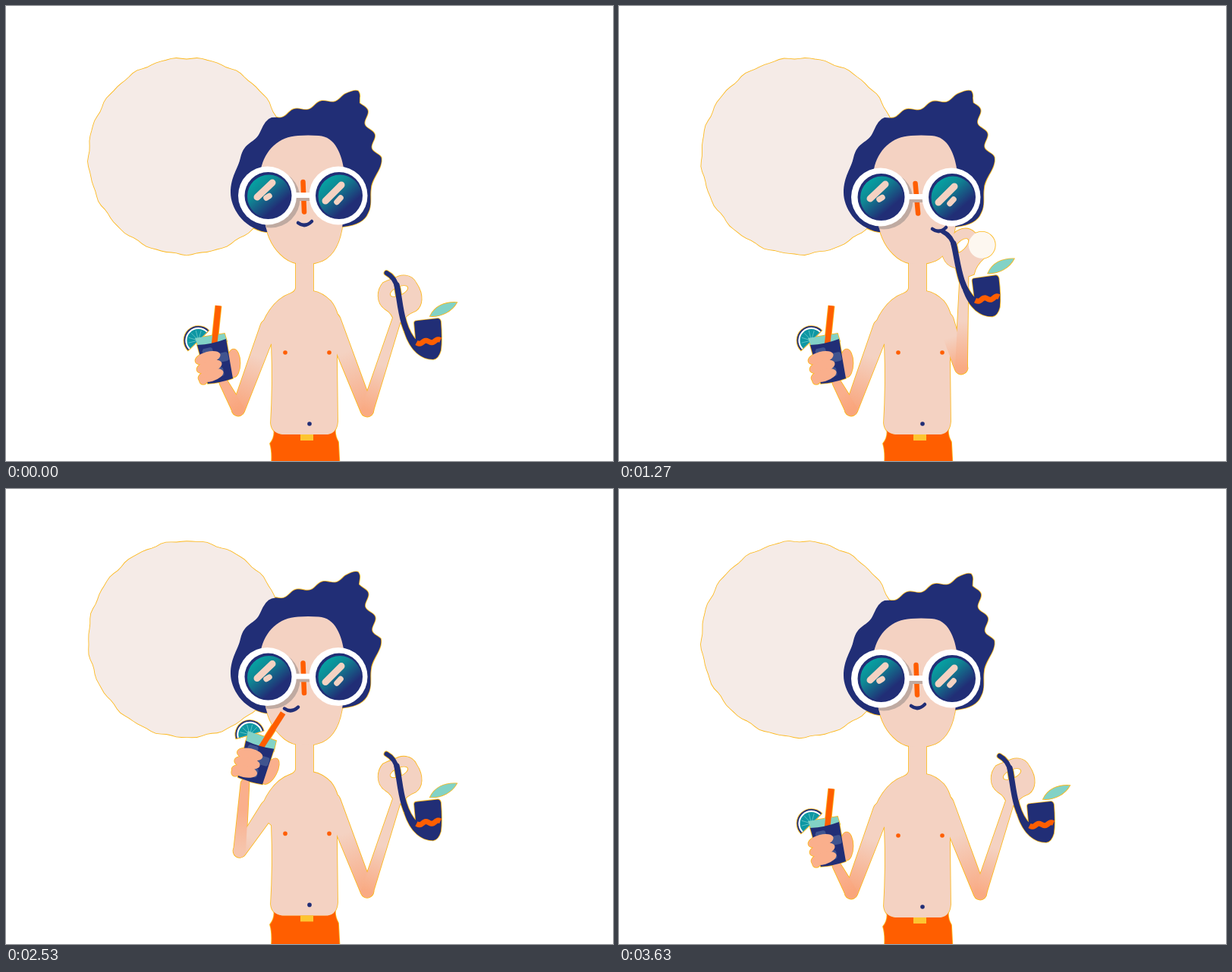
An HTML page with a canvas that plays this animation: 800x600 px, repeating every 3660 ms.

```html
<!DOCTYPE html>
<html lang="en">
<head>
<meta charset="utf-8">
<title>Summer break</title>
<style>
html, body { margin: 0; width: 100%; height: 100%; overflow: hidden; background: #fff; }
canvas { display: block; }
</style>
</head>
<body>
<canvas id="stage" width="800" height="600"></canvas>
<script>
const ctx = document.getElementById('stage').getContext('2d');
const LOOP = 3660, DEG = Math.PI / 180, TAU = Math.PI * 2;
const SKIN = '#f4d2c2', HAND = '#faaf8c', NAVY = '#212e76', ORANGE = '#ff5e00',
      MINT = '#82d2c6', TEAL = '#0e97a3', RIM = '#fcb81c';
let outline = false;   // first pass lays a thin rim under the whole silhouette

const ease = (t, from, to) => {
  const u = Math.min(1, Math.max(0, (t - from) / (to - from)));
  return u * u * (3 - 2 * u);
};
const pulse = (t, a, b, c, d) => ease(t, a, b) - ease(t, c, d);
const mix = (a, b, u) => a.map((v, i) => v + (b[i] - v) * u);
const tan = k => `rgb(${244 + 5 * k}, ${210 - 45 * k}, ${194 - 70 * k})`;

// How far each action has gone, 0 to 1
function poseAt(t) {
  const puff = pulse(t, 320, 680, 1830, 2400);
  return {
    t, puff, sip: pulse(t, 1780, 2220, 2980, 3430),
    arc: puff ** 1.3, late: puff ** 2,
    gasp: pulse(t, 500, 660, 720, 950), suck: pulse(t, 1960, 2110, 2160, 2600)
  };
}

function oval(x, y, rx, ry = rx, angle = 0) {
  const path = new Path2D();
  path.ellipse(x, y, rx, ry, angle * DEG, 0, TAU);
  return path;
}

function fill(color, path) {
  if (typeof path === 'string') path = new Path2D(path);
  ctx.fillStyle = outline ? RIM : color;
  ctx.fill(path, 'evenodd');
  if (outline) {
    ctx.strokeStyle = RIM;
    ctx.lineWidth = 1.7;
    ctx.stroke(path);
  }
}

function line(color, width, d, cap = 'round') {
  ctx.strokeStyle = outline ? RIM : color;
  ctx.lineWidth = width + (outline ? 1.7 : 0);
  ctx.lineCap = cap;
  ctx.stroke(new Path2D(d));
}

// Moves a drawing by x, y and turns it about the pivot px, py
function group(draw, x, y, angle = 0, px = 0, py = 0) {
  ctx.save();
  ctx.translate(x + px, y + py);
  ctx.rotate(angle * DEG);
  ctx.translate(-px, -py);
  draw();
  ctx.restore();
}

function gradient(x0, y0, x1, y1, ...stops) {
  const g = ctx.createLinearGradient(x0, y0, x1, y1);
  stops.forEach(([at, color]) => g.addColorStop(at, color));
  return g;
}

// Tapered limb with round ends
function limb([x0, y0], [x1, y1], w0, w1, ...stops) {
  const a = Math.atan2(y1 - y0, x1 - x0), q = Math.PI / 2, path = new Path2D();
  path.arc(x0, y0, w0 / 2, a + q, a + 3 * q);
  path.arc(x1, y1, w1 / 2, a - q, a + q);
  path.closePath();
  fill(gradient(x0, y0, x1, y1, ...stops), path);
}

// Wavy edge between two points, as path commands
function ripple(x0, y0, x1, y1, waves, height, phase) {
  const length = Math.hypot(x1 - x0, y1 - y0);
  let d = '';
  for (let u = 0; u <= 1; u += 1 / 40) {
    const h = height * Math.sin(waves * TAU * u + phase);
    d += `L${x0 + (x1 - x0) * u - (y1 - y0) / length * h} ${y0 + (y1 - y0) * u + (x1 - x0) / length * h}`;
  }
  return d;
}

const face = new Path2D('M336 215C341 190 360 172 385 171Q398 170 412 171C434 172 443 196 446 220' +
  'L444 285C441 312 432 329 417 336Q405 341 393 340Q379 341 367 332C352 320 345 305 341 285Z');
const torso = 'M382 330V371Q382 376 375 379C352 387 339 412 334 432L350 446Q352 500 349 550' +
  'Q350 563 364 565H424Q436 563 437 548L436 457L442 437C440 415 437 400 428 389Q417 378 405 376V330Z';
const okHand = new Path2D('M512 417Q509 405 500 400C487 391 489 374 497 365Q504 361 511 360' +
  'C520 353 535 353 541 366C551 381 549 396 540 402Q527 407 521 417Z');
okHand.addPath(oval(518, 376, 13, 6, -25));

function drawSun({ t }) {
  const path = new Path2D(), phase = t / LOOP * TAU;
  for (let a = 0; a < TAU; a += TAU / 120) {
    const r = 129 + .8 * Math.sin(17 * a + 3 * phase) + .6 * Math.sin(29 * a - 5 * phase);
    path.lineTo(238 + r * Math.cos(a), 198 + r * Math.sin(a));
  }
  path.closePath();
  fill('#f5ebe7', path);
}

function drawHair({ t }) {
  const sway = .4 * Math.sin(4 * t / LOOP * TAU);
  fill(NAVY, 'M395 300L342 298C311 292 296 265 296 246C296 225 306 214 309 200C314 178 328 182 335 166' +
    'Q342 149 350 147' + ripple(356, 146, 450, 118, 2.7, 3, .3 + sway) +
    'Q459 110 464 112Q467 116 466 121' + ripple(469, 127, 491, 203, 2.4, -4.5, -.8 + sway) +
    'C497 214 482 226 481 240C479 252 483 262 477 273Q471 288 445 291Z');
}

function drawBody() {
  fill(ORANGE, 'M353 558Q356 565 366 565H420Q432 565 434 558Q433 566 438 575L440 612H349' +
    'Q352 590 348 577Q355 568 353 558Z');
  fill(SKIN, torso);
  if (outline) return;
  fill('#fdc531', 'M388 565H405V573H388Z');
  for (const x of [368, 426]) fill(ORANGE, oval(x, 457, 2.8));
  fill(NAVY, oval(400, 551, 2.8));
}

function drawLens(x) {
  fill('#fff', oval(x, 250, 38.5));
  fill(NAVY, oval(x + 1, 250, 31));
  fill(gradient(x - 18, 229, x + 20, 274, [0, '#05a3a3'], [.3, '#0f8794'], [.8, NAVY]),
    oval(x + 2, 251, 28.5));
}

function drawGlasses(y) {
  ctx.save();
  ctx.clip(face);
  fill('#bfaaa1', oval(349, 254 + y, 38.5));
  line('#bfaaa1', 7, `M380 ${253.5 + y}H404`, 'butt');
  ctx.restore();
  group(() => {
    line('#fff', 7, 'M378 249.5H404', 'butt');
    drawLens(344.5);
    drawLens(438);
    line(SKIN, 9, 'M331 252L351 233M421 257L442 236');
    line(SKIN, 7.5, 'M343 253L347 250.5M436 258.5L441 253');
  }, 0, y);
}

function drawHead({ puff, late, sip, gasp, suck }) {
  fill(SKIN, face);
  if (outline) return;
  const glassesY = 2 * puff + 2 * suck;
  group(() => line(ORANGE, 6.5, 'M391.5 232L393 271.5'), 0, glassesY, -3 * late, 392, 250);
  drawGlasses(glassesY);
  const open = gasp + suck, bend = 1 - open;
  const x = 394 + 28 * late - 18 * sip - 5 * gasp, y = 287 + 8 * late + 5 * sip + 4 * gasp + 15 * suck;
  line(NAVY, 4.5, `M${x - 9} ${y - bend}Q${x} ${y + 6 * bend} ${x + 9} ${y - 3 * bend}`);
  fill(NAVY, oval(x, y, 9 + 2 * open, .5 + 5 * open, -4));
}

function drawLime() {
  [[19, NAVY], [17.2, '#fff'], [15, TEAL]].forEach(([r, color]) =>
    fill(color, `M${-r} 0A${r} ${r} 0 0 1 ${r} 0Z`));
  if (outline) return;
  for (let a = 30; a < 180; a += 30) {
    const x = Math.cos(a * DEG), y = -Math.sin(a * DEG);
    line('#6cc5c8', .8, `M${3 * x} ${3 * y}L${13 * x} ${13 * y}`);
  }
}

function drawDrink({ t, sip, suck }) {
  const elbow = mix([306, 532], [308, 480], sip), wrist = mix([287, 497], [315, 391], sip);
  const angle = 28 * sip, warmth = 1 - .7 * sip;
  limb([346, 424], elbow, 22, 17, [0, SKIN], [.35 + .3 * sip, SKIN], [1, tan(warmth)]);
  limb(elbow, wrist, 16, 11, [0, tan(warmth)], [.6, HAND], [1, HAND]);
  group(() => {
    const d = 7 * pulse(t, 2150, 2900, 3020, 3430);
    fill(HAND, oval(300, 471, 8.5, 18.5));
    group(drawLime, 253.5, 441, -44);
    fill(MINT, `M249 438L288 432L${291 + d / 6} ${442 + d}L${253 + d / 5} ${448 + d}Z`);
    group(() => line(ORANGE, 7.5, 'M0 14V-47', 'butt'), 275, 442, 6 + 25 * sip + 24 * suck - angle);
    fill(NAVY, `M${252 + d / 5} ${447 + d}Q272 ${446 + d} ${290 + d / 6} ${439 + d}L299 491Q283 497 266 498Z`);
    if (!outline) {
      for (const [x, y] of [[266, 457], [286, 463], [280, 483]])
        group(() => fill('#40548f', 'M-5 -6H4Q7 -6 7 -3V3Q7 6 4 6H-4Q-7 6 -7 3V-3Z'), x, y, -12);
    }
    for (let i = 0; i < 3; i++) fill(HAND, oval(266 + 2 * i, 464 + 11.5 * i, 17, 8, -16));
    fill(HAND, oval(260, 494, 5));
  }, 53 * sip, -107 * sip, angle, 276, 467);
}

// Puffs rise out of the bowl while the pipe is in the mouth
function drawPuffs(t) {
  for (const birth of [1085, 1625]) {
    const age = t - birth;
    if (age < 0 || age > 380) continue;
    const r = 17.5 * Math.min(1, .45 + age / 190, (380 - age) / 130);
    fill('#fdf7f0', oval(490 - age * .063, 359 - age * .235, r));
  }
}

function drawPipe({ t, puff, arc, late, gasp }) {
  const x = -72 * puff - 3 * gasp, y = -56 * arc + 4 * gasp;
  const angle = 5 * Math.sin(Math.PI * puff) - 2 * puff;
  const elbow = mix([476, 533], [451, 477 + 6 * gasp], arc);
  const wrist = mix([515, 413], [455, 354], puff);
  const held = draw => group(draw, x, y, angle, 545, 430);
  limb([430, 415], elbow, 22, 17, [0, SKIN], [.35, SKIN], [1, tan(.9)]);
  limb(elbow, wrist, 16, 11, [0, tan(.9)], [.5, SKIN], [1, SKIN]);
  group(() => fill(SKIN, okHand), x, y, -20 * late, 510, 360);
  held(() => fill(MINT, 'M559 409C565 396 578 390 594 391C588 402 574 410 559 409Z'));
  drawPuffs(t);
  held(() => {
    line(NAVY, 6, 'M501.5 352Q513 358 516.5 374');
    line(NAVY, 7.5, 'M515 368C520 390 520 425 539 444');
    fill(NAVY, 'M538 418Q538 415 542 415L569 412Q572 412 573 416Q575 440 573 454Q570 465 563 466' +
      'C548 466 533 455 525 430L540 440Z');
    if (!outline) line(ORANGE, 7, 'M541' + ripple(541, 444, 573.5, 441, 2, 1.7, 0).replace('L541', ''), 'butt');
  });
}

function drawScene(pose) {
  const { sip, suck, gasp } = pose;
  drawSun(pose);
  group(() => {
    const nod = suck - gasp;
    group(() => drawHair(pose), 0, nod);
    drawBody();
    group(() => drawHead(pose), 0, nod);
    drawDrink(pose);
    drawPipe(pose);
  }, 0, 6 * suck - 3 * sip);
}

function frame(now) {
  const pose = poseAt(now % LOOP);
  ctx.clearRect(0, 0, 800, 600);
  for (outline of [true, false]) drawScene(pose);
  requestAnimationFrame(frame);
}
requestAnimationFrame(frame);
</script>
</body>
</html>
```
